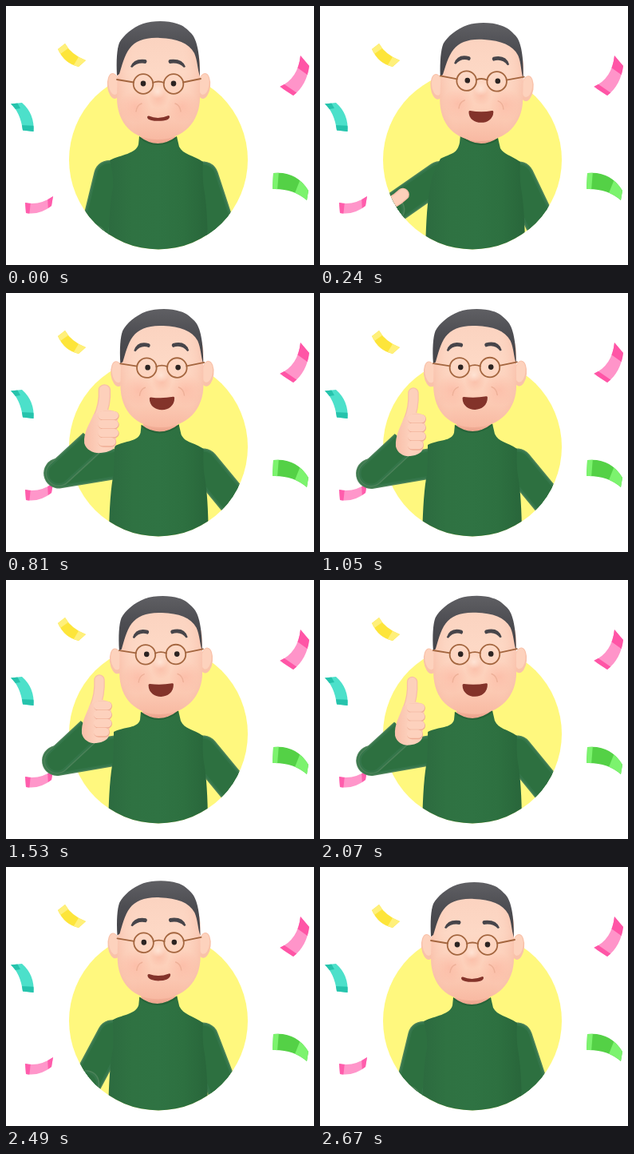
An HTML page with a canvas for the animation above (2700 ms loop, 386 px wide and 324 px high).

```html
<!DOCTYPE html>
<html lang="en">
<head>
<meta charset="utf-8">
<title>Thumbs up</title>
<style>
html, body { margin: 0; width: 100%; height: 100%; overflow: hidden; background: #fff; }
canvas { display: block; width: 386px; height: 324px; }
</style>
</head>
<body>
<canvas id="stage" width="386" height="324"></canvas>
<script>
const ctx = document.getElementById('stage').getContext('2d');
const LOOP = 2700;
const CIRCLE = [191, 192.5, 112];
const SKIN = '#fdd2bd', KNIT = '#2d7040', KNIT_MID = '#34764a', KNIT_RIM = '#4c8259';

// head x, y, tilt, face shift, mouth | neck x, y, body x | shoulder corner |
// arm shoulder, elbow, wrist | hand x, y, turn, width | far elbow
const FIELDS = 'hx hy tilt face open nx ny bx cx cy sx sy ex ey wx wy px py turn wide rx ry'.split(' ');
const POSES = {
  rest: [0, 0, 0, 0, 0, 0, 0, 0, 130, 193, 129, 212, 110, 290, 105, 320, 100, 340, 1.4, 1, 272, 290],
  wave: [11.5, 2, .02, -5.5, .85, 9, 0, 4, 151, 191, 150, 213, 90, 255, 78, 264, 62, 267, .87, 1.15, 282, 283],
  up: [7, 1, .005, -4.5, .95, 4, 2, 2, 139, 193, 146, 213, 71, 225, 111, 186, 126, 170, 0, 1.3, 291, 267],
  hold: [3, 1, -.008, -5.3, 1, 2, 1, 0, 135, 190, 140, 213, 64, 226, 105, 188, 114, 178, 0, 1, 290, 266],
  drop: [2, -5, -.015, -3.5, .72, 1, -3, 0, 140, 188, 140, 207, 78, 233, 72, 272, 70, 300, -.3, 1, 284, 280]
};
const KEYS = [[0, 'rest'], [20, 'rest'], [240, 'wave'], [570, 'up'], [1050, 'hold'],
  [2050, 'hold'], [2280, 'drop'], [2640, 'rest'], [2700, 'rest']];

// Monotone cubic interpolation: keys are passed smoothly, without overshoot.
function track(field, t) {
  const time = i => KEYS[i][0], value = i => POSES[KEYS[i][1]][field];
  const slope = i => (value(i + 1) - value(i)) / (time(i + 1) - time(i));
  const tangent = i => {
    if (i === 0 || i === KEYS.length - 1) return 0;
    const a = slope(i - 1), b = slope(i);
    return a * b <= 0 ? 0 : 2 * a * b / (a + b);
  };
  let i = 0;
  while (i < KEYS.length - 2 && t >= time(i + 1)) i++;
  const d = time(i + 1) - time(i), u = (t - time(i)) / d, v = 1 - u;
  return value(i) * v * v * (1 + 2 * u) + value(i + 1) * u * u * (3 - 2 * u)
    + d * u * v * (tangent(i) * v - tangent(i + 1) * u);
}

const poseAt = t => Object.fromEntries(FIELDS.map((name, i) => [name, track(i, t)]));

function fill(color, path) {
  ctx.fillStyle = color;
  ctx.fill(typeof path === 'string' ? new Path2D(path) : path);
}

function stroke(color, width, path) {
  ctx.strokeStyle = color;
  ctx.lineWidth = width;
  ctx.stroke(typeof path === 'string' ? new Path2D(path) : path);
}

function ellipse(color, x, y, rx, ry, angle = 0) {
  ctx.beginPath();
  ctx.ellipse(x, y, rx, ry, angle, 0, Math.PI * 2);
  ctx.fillStyle = color;
  ctx.fill();
}

function linear(x0, y0, x1, y1, ...colors) {
  const g = ctx.createLinearGradient(x0, y0, x1, y1);
  colors.forEach((c, i) => g.addColorStop(i / (colors.length - 1), c));
  return g;
}

function glow(rgb, alpha, x, y, r) {
  const g = ctx.createRadialGradient(x, y, 0, x, y, r);
  g.addColorStop(0, `rgba(${rgb},${alpha})`);
  g.addColorStop(1, `rgba(${rgb},0)`);
  ellipse(g, x, y, r, r);
}

function ribbon(outline, color, endColor, ...ends) {
  const shape = new Path2D(outline);
  fill(color, shape);
  ctx.save();
  ctx.clip(shape);
  ends.forEach(end => fill(endColor, end));
  ctx.restore();
}

function confetti() {
  ribbon('M65 54L74 47Q82 61 100 68L91 76Q73 72 65 54Z', '#fde53a', '#fff07a',
    'M60 50L75 43L78 53L68 60Z', 'M92 62L104 64L98 80L83 77Z');
  ribbon('M6 122.5L20 121Q36 135 34.5 157L21 155.5Q18 133 6 122.5Z', '#4ce0ca', '#26c3ac',
    'M3 118L13 119L18 128L6 130Z', 'M17 149L38 150V160H17Z');
  ribbon('M24 246Q42 250 59 238L57 250Q42 262 25 259Z', '#ff96ca', '#ff5dac',
    'M20 240L31 244L29 264H20Z', 'M52 238L62 234V256L53 258Z');
  ribbon('M369 62L380 75Q377 99 360 112L343 101Q366 91 369 62Z', '#ff94c9', '#ff55a6',
    'M364 58L384 70L379 87L365 77Z', 'M340 97L349 98L365 109L360 116Z');
  ribbon('M335 209Q364 206 379 231L377 243Q360 228 334 229Z', '#54d146', '#7cf36e',
    'M330 205L342 206L340 231H330Z', 'M370 214L382 226L380 246L362 234Z');
}

function limb(width, path, cap) {
  ctx.lineCap = cap;
  ctx.lineJoin = 'round';
  stroke(KNIT_RIM, width, path);
  stroke(KNIT_MID, width - 3, path);
  stroke(KNIT, width - 8, path);
}

function torso(p) {
  const l = 167 + p.nx, r = 214 + p.nx, y = 163 + p.ny, b = p.bx;
  const ly = y - p.tilt * 100, ry = y + p.tilt * 100;
  fill(linear(0, y, 0, y + 14, '#f6b49d', '#e59a83'),
    `M${l + 2} ${y - 22}H${r - 2}V${y + 15}H${l + 2}Z`);
  const shape = new Path2D(
    `M${l} ${ly}Q${l + 23} ${y + 18} ${r} ${ry}L${r + 3} ${ry + 13}
     C${r + 8} ${y + 23} ${234 + b} 186 ${247 + b} 195 Q${246 + b} 215 ${248 + b} 228
     Q${253 + b} 255 ${253 + b} 310H${128 + b}Q${129 + b} 250 ${134 + b} 227
     Q${135 + b} 212 ${p.cx} ${p.cy}C${p.cx + 14} ${p.cy - 7} ${l - 4} ${y + 22} ${l - 1} ${ly + 10}Z`);
  fill(linear(126 + b, 0, 256 + b, 0, '#2c6a3f', '#2f7242', '#2f7343', '#2d7040', '#28653a'), shape);
  ctx.save();
  ctx.clip(shape);
  stroke('rgba(18,66,36,.3)', 4, `M${l} ${ly}Q${l + 23} ${y + 18} ${r} ${ry}`);
  ctx.restore();
}

function mouth(open) {
  const w = 12.5 + 1.7 * open, h = 3.5 + 10 * open, sag = 3 * (1 - open);
  const y = 139 - 3.3 * open;
  const shape = new Path2D(
    `M${191 - w} ${y}Q191 ${y + sag + 2} ${191 + w} ${y - .5}
     C${191 + w} ${y + h * 1.3} ${191 - w} ${y + h * 1.3} ${191 - w} ${y}Z`);
  ctx.lineJoin = 'round';
  fill('#83332a', shape);
  stroke('#83332a', 3, shape);
}

function face(open, lid) {
  const arch = 2 * open, gaze = 1.3 * open;
  ctx.lineCap = 'round';
  glow('250,150,130', .3, 162, 126, 20);
  glow('250,150,130', .3, 221, 126, 20);
  glow('246,150,126', .3, 191, 115, 13);
  glow('255,232,218', .8, 190, 107, 9);
  stroke('#eeb098', 1.5, 'M170 122Q164 124 163 132');
  stroke('#eeb098', 1.5, 'M212 122Q218 124 219 132');
  fill('#47454a', `M156 76Q160 ${65 - arch} 175 67Q178 69 175 72Q165 ${70 - arch} 158 77Z`);
  fill('#47454a', `M225 76Q221 ${65 - arch} 205 67Q202 69 205 72Q216 ${70 - arch} 223 77Z`);
  for (const x of [172, 210]) {
    ellipse('#2c2422', x + gaze, 97, 3.3, Math.max(.7, 3.4 * (1 - lid)));
    ctx.beginPath();
    ctx.arc(x, 97.5, 12.3, 0, Math.PI * 2);
    ctx.strokeStyle = '#a4663f';
    ctx.lineWidth = 1.8;
    ctx.stroke();
  }
  stroke('#a4663f', 1.8, 'M184 96Q191 93 198 96M160 95.5L139 92M222 95.5L244 91');
  mouth(open);
}

function head(p, lid) {
  ctx.save();
  ctx.translate(191 + p.hx, 100 + p.hy);
  ctx.rotate(p.tilt);
  ctx.translate(-191, -100);
  for (const [x, turn] of [[135, -.12], [248, .12]]) {
    ellipse('#f9c2aa', x, 100, 8, 16, turn);
    ellipse(SKIN, x, 98, 6.5, 13, turn);
  }
  const skull = new Path2D('M140 72Q142 34 191 33Q241 34 243 72V114C243 145 222 167 190 167C160 167 139 148 139 114Z');
  fill(linear(0, 40, 0, 168, '#fbd3c0', '#fdd8c5', '#fdd0ba', '#f8b9a2'), skull);
  ctx.save();
  ctx.clip(skull);
  fill(linear(138, 0, 244, 0, 'rgba(240,150,125,.28)', 'rgba(255,220,200,0)',
    'rgba(255,220,200,0)', 'rgba(255,220,200,0)', 'rgba(240,150,125,.28)'), 'M130 30H250V170H130Z');
  ctx.restore();
  fill(linear(0, 18, 0, 85, '#606064', '#4d4d52', '#444449'),
    `M139 87C138 68 139 54 142 46C147 37 158 27 172 22C184 18 203 18 214 22
     C222 24 227 29 232 34C240 42 243 62 243 88C240 79 240 68 236 59C229 46 214 41 193 40
     C174 39 162 44 155 53C148 62 145 76 142 85Z`);
  ctx.translate(0, p.face);
  face(p.open, lid);
  ctx.restore();
}

function hand(p) {
  ctx.save();
  ctx.translate(p.px, p.py);
  ctx.rotate(p.turn);
  ctx.scale(p.wide, 1);
  ctx.lineCap = 'round';
  stroke('#f8bfa8', 13.5, 'M-3 -18Q4 -35 3 -53');
  stroke('#fdd0bb', 11, 'M-3 -18Q4 -35 3 -53');
  fill(linear(-18, 0, 19, 0, '#f9c0aa', '#fdd2be', '#fccbb5'),
    'M-9 -22C-14 -8 -20 0 -19 14C-17 23 -8 27 -1 26C8 25 13 22 15 17L18 -20Q14 -29 4 -28Z');
  for (let i = 0; i < 4; i++) {
    const y = -21 + i * 11, right = 13 - (i === 3 ? 3 : 0);
    stroke('#efad95', 12, `M2 ${y + .8}H${right}`);
    stroke('#fdd1bd', 10.5, `M1 ${y}H${right}`);
  }
  ctx.restore();
}

// Only the head may rise above the circle; a raised arm is drawn unclipped.
function clipped(active, draw) {
  ctx.save();
  if (active) {
    const region = new Path2D();
    region.rect(0, 0, 386, 150);
    region.arc(...CIRCLE, 0, Math.PI * 2);
    ctx.clip(region);
  }
  draw();
  ctx.restore();
}

function draw(t) {
  const p = poseAt(t);
  const armInside = t < 330 || t > 2190;
  const lid = Math.max(0, 1 - Math.abs(t - 1365) / 120);
  ctx.fillStyle = '#fff';
  ctx.fillRect(0, 0, 386, 324);
  ellipse('#fff87e', CIRCLE[0], CIRCLE[1], CIRCLE[2], CIRCLE[2]);
  confetti();
  clipped(true, () => limb(39, `M${247 + p.bx / 2} 214L${p.rx} ${p.ry}`, 'round'));
  clipped(armInside, () => {
    limb(38, `M${p.sx} ${p.sy}L${p.ex} ${p.ey}`, 'round');
    limb(33, `M${p.wx} ${p.wy}L${p.ex} ${p.ey}L${p.wx} ${p.wy}`, 'butt');
  });
  clipped(true, () => {
    torso(p);
    head(p, lid);
  });
  clipped(armInside, () => hand(p));
}

function frame(now) {
  draw(now % LOOP);
  requestAnimationFrame(frame);
}
draw(0);
requestAnimationFrame(frame);
</script>
</body>
</html>
```
